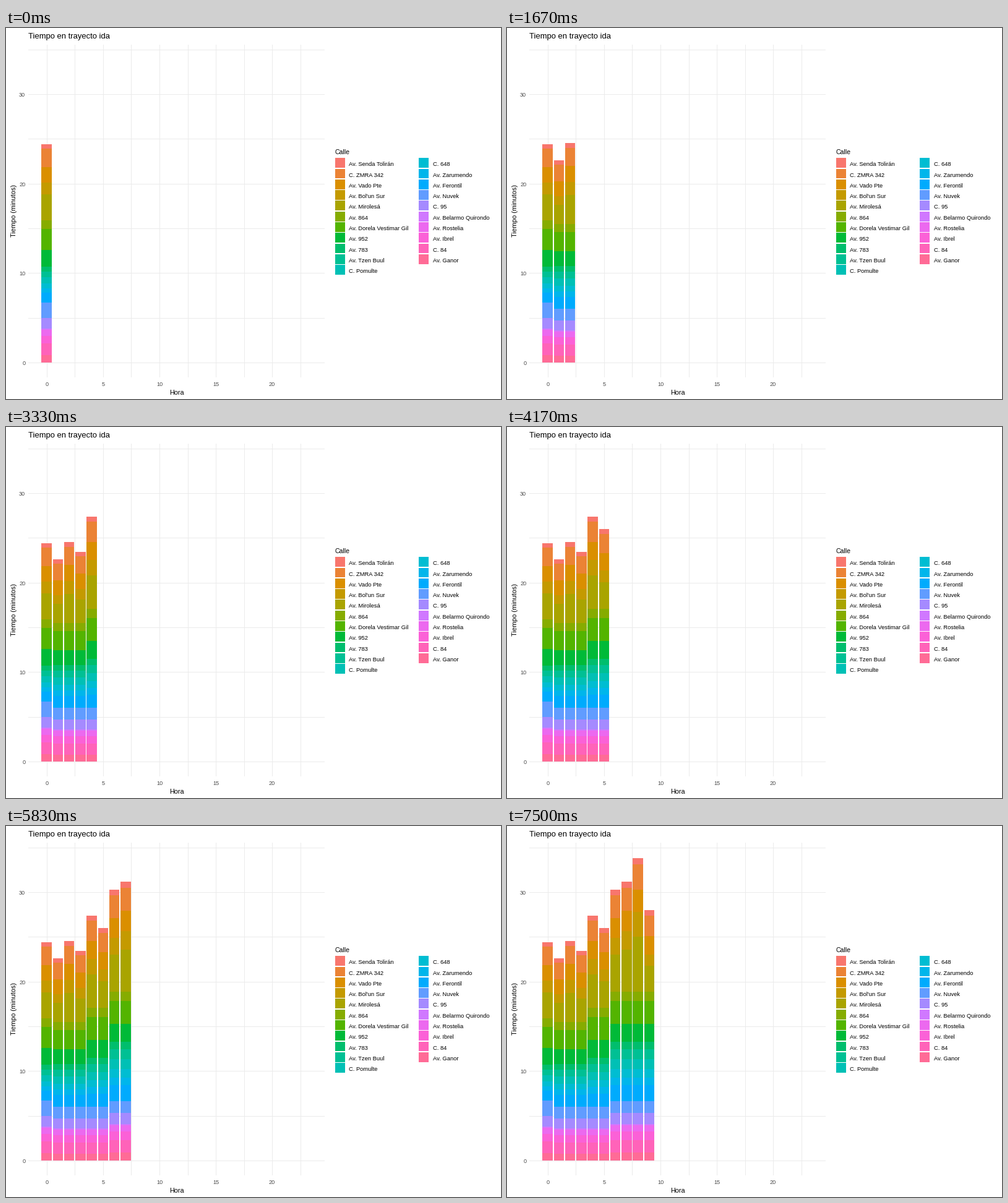
Animation of 800x600 px, one loop 8 s. Source, as a matplotlib script:

```python
import numpy as np
import matplotlib.pyplot as plt
from matplotlib.animation import FuncAnimation
from matplotlib.collections import PolyCollection

plt.rcParams["font.family"] = "Liberation Sans"

W, H, DPI = 800, 600, 100
LOOP, STEP = 8000, 20
BAR_TIME = 2500 / 3          # ms between two new bars
BASE, X0, DX = 541, 65.69, 18.23

STREETS = [
    "Av. Senda Tolirán", "C. ZMRA 342", "Av. Vado Pte", "Av. Bol'un Sur",
    "Av. Mirolesá", "Av. 864", "Av. Dorela Vestimar Gil", "Av. 952",
    "Av. 783", "Av. Tzen Buul", "C. Pomulte", "C. 648", "Av. Zarumendo",
    "Av. Ferontil", "Av. Nuvek", "C. 95", "Av. Belarmo Quirondo",
    "Av. Rostelia", "Av. Ibrel", "C. 84", "Av. Ganor",
]

TOPS = [188, 214, 186, 202, 145, 165, 103, 90, 52, 136]
# Traffic phase by first hour: edges of streets 5, 8, 14, 15 and 16
PHASES = {
    0: (311, 386, 444, 469, 486),
    1: (317, 385, 454, 473, 489),
    4: (294, 375, 454, 473, 489),
    6: (268, 349, 445, 464, 482),
}


def hue_color(i, n, light=65, chroma=100):
    """Evenly spaced hue in polar LUV, as an RGB triple."""
    h = np.radians(15 + 360 * i / n)
    y = ((light + 16) / 116) ** 3
    u = chroma * np.cos(h) / (13 * light) + 0.19784
    v = chroma * np.sin(h) / (13 * light) + 0.46834
    x = 9 * y * u / (4 * v)
    z = y * (12 - 3 * u - 20 * v) / (4 * v)
    rgb = np.array([
        3.24048 * x - 1.53715 * y - 0.49854 * z,
        -0.96926 * x + 1.87599 * y + 0.04156 * z,
        0.05565 * x - 0.20404 * y + 1.05731 * z,
    ])
    rgb = np.clip(rgb, 0, 1)
    return np.where(rgb > 0.00304, 1.055 * rgb ** (1 / 2.4) - 0.055, 12.92 * rgb)


def box(left, top, right, bottom):
    return [(left, top), (right, top), (right, bottom), (left, bottom)]


def split(a, b, *shares):
    """Start of a span and its inner edges at the given shares."""
    return [a] + [a + s * (b - a) for s in shares]


def bar_boxes(hour, top):
    slow, center, blue, lilac, pink = PHASES[max(h for h in PHASES if h <= hour)]
    upper = top + 0.177 * (BASE - top)
    ys = np.round(
        split(top, upper, 0.12, 0.59)
        + split(upper, slow, 0.31)
        + split(slow, center, 0.19, 0.64)
        + split(center, blue, 0.13, 0.29, 0.46, 0.60, 0.73)
        + [blue, lilac]
        + split(pink, BASE, 0.03, 0.21, 0.44, 0.78)
        + [BASE])
    mid, half = X0 + DX * hour, 0.45 * DX
    left, right = round(mid - half), round(mid + half)
    return [box(left, a, right, b) for a, b in zip(ys, ys[1:])]


fig = plt.figure(figsize=(W / DPI, H / DPI), dpi=DPI, facecolor="white")
ax = fig.add_axes([0, 0, 1, 1])
ax.set_xlim(0, W)
ax.set_ylim(H, 0)
ax.axis("off")


def fill(boxes, colors):
    shapes = PolyCollection(boxes, facecolors=colors, edgecolors="none",
                            linewidths=0, antialiased=False)
    return ax.add_collection(shapes, autolim=False)


def label(x, y, text, px, color="black", **kw):
    ax.text(x, y, text, fontsize=px * 72 / DPI, color=color,
            va="baseline", **kw)


# Grid
cols = [int(66.2 + 45.575 * k) for k in range(10)]
rows = [int(541.6 - 72.33 * k) for k in range(8)]
fill([box(x, 27, x + 1, 565) for x in cols]
     + [box(36, y, 515, y + 1) for y in rows], ["#EBEBEB"])

# Titles and axis labels
label(36, 17, "Tiempo en trayecto ida", 13)
label(275.5, 593, "Hora", 10.8, ha="center")
label(16, 295.5, "Tiempo (minutos)", 10.9, ha="center",
      rotation=90, rotation_mode="anchor")
for k in range(5):
    label(cols[2 * k], 579, str(5 * k), 9.2, "#4D4D4D", ha="center")
for k in range(4):
    label(31.3, rows[2 * k] + 4.4, str(10 * k), 9.2, "#4D4D4D", ha="right")

# Legend
count = len(STREETS)
colors = [hue_color(i, count) for i in range(count)]
label(532, 204, "Calle", 10.5)
keys = []
for i, street in enumerate(STREETS):
    col, line = divmod(i, 11)
    x, y = 532 + 135 * col, 210.3 + 17.28 * line
    keys.append(box(x, round(y), x + 16, round(y + 15.86)))
    label(x + 22 + col, round(y) + 13, street, 9.4)
fill(keys, colors)

# Bars
parts = [b for hour, top in enumerate(TOPS) for b in bar_boxes(hour, top)]
bars = fill(parts[:count], colors)


def update(frame):
    shown = 1 + int((frame * STEP + 14) / BAR_TIME)
    bars.set_verts(parts[:shown * count])
    return [bars]


anim = FuncAnimation(fig, update, frames=LOOP // STEP, interval=STEP,
                     repeat=True, repeat_delay=0)
plt.show()
```
